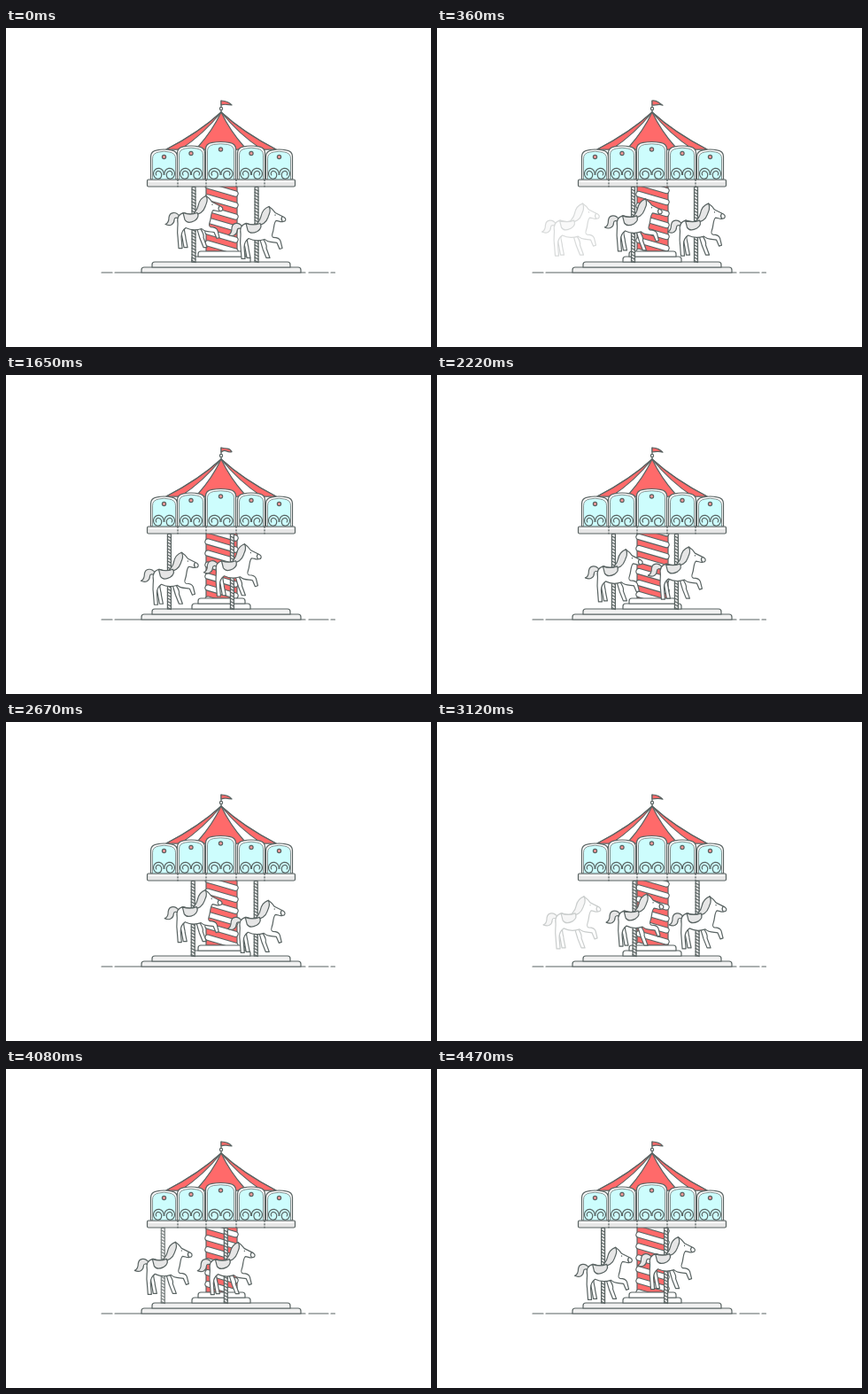
Write an HTML page that moves like this. It is 480x360 px and loops after 4.5 s.

```html
<!DOCTYPE html>
<html lang="en">
<head>
<meta charset="utf-8">
<title>Carousel</title>
<style>
  html, body { margin: 0; width: 100%; height: 100%; overflow: hidden; background: #fff; }
  svg { display: block; width: 100vw; height: 100vh; }
  .line { fill: none; stroke: #596362; stroke-width: 1.2; stroke-linecap: round; stroke-linejoin: round; }
  .white { fill: #fff; }
  .gray { fill: #e6e6e6; }
  .pale { fill: #f1f1f1; }
  .red { fill: #ff6a6a; }
  .pink { fill: #ff9a9a; }
  .cyan { fill: #cdfdfd; }
</style>
</head>
<body>
<svg id="stage" viewBox="0 0 480 360">
  <defs>
    <clipPath id="shaft"><rect x="223" y="179" width="41" height="73"/></clipPath>
    <g id="horse" class="line">
      <path class="gray" d="M-16 23C-20 17-27 18-28 24C-28 29-29 31-32 32C-26 35-22 31-22 27C-22 24-19 24-16 26Z"/>
      <path class="white" d="M-10 35C-12 40-9 43-9 48L-7 58H-11L-13 47L-15 38Z"/>
      <path class="white" d="M7 36C10 41 12 43 11 47L15 58H11L7 48L4 38Z"/>
      <path class="white" d="M14 0C17 2 19 4 21 7L31 12C34 14 33 17 30 17C27 18 25 16 22 16C19 19 20 25 18 30
        C17 33 17 34 19 35C23 35 26 36 27 39L29 47L26 48L23 41C19 40 13 41 9 37C3 39-3 39-9 36
        C-12 38-14 41-14 46L-13 59H-17L-18 46C-19 40-18 36-18 31C-19 25-17 20-11 19C-5 21 1 21 4 18C8 13 6 4 14 0Z"/>
      <path class="gray" d="M14 0C8 2 6 6 5 11C4 16 2 17 0 20C6 22 11 18 13 12C14 8 17 6 14 0Z"/>
      <path class="gray" d="M-12 19Q-4 22 4 19Q7 24 1 28Q-7 32-10 27Z"/>
      <path d="M29 11.500Q27 14 29 16.500M21 9.500v.4"/>
    </g>
  </defs>
  <g class="line">
    <path d="M108 276H120M123 276H338M342 276H364M367 276H371.500"/>
    <path class="pale" d="M153 276V273Q153 270 156 270H330Q333 270 333 273V276Z"/>
    <path class="pale" d="M165 270V267Q165 264 168 264H318Q321 264 321 267V270Z"/>
    <path class="red" d="M226 178H261V252H226Z"/>
    <g clip-path="url(#shaft)"><g id="twist"></g></g>
    <path class="white" d="M210 264V261Q210 258 213 258H273Q276 258 276 261V264Z"/>
    <path class="white" d="M217 258V255Q217 252 220 252H267Q270 252 270 255V258Z"/>
  </g>
  <g id="riders"></g>
  <g class="line">
    <path d="M243 95V82"/>
    <path id="flag" class="red"/>
    <circle class="white" cx="243" cy="91" r="1.600"/>
    <path class="white" d="M243 95Q218 118 181 137H305Q268 118 243 95Z"/>
    <path class="red" d="M243 95Q218 118 181 137H197Q223 120 243 95Z"/>
    <path class="red" d="M243 95Q268 118 305 137H289Q263 120 243 95Z"/>
    <path class="red" d="M243 95Q233 116 217 134V137H269V134Q253 116 243 95Z"/>
  </g>
  <g id="panels" class="line"></g>
  <g class="line">
    <rect class="gray" x="159.500" y="171" width="167" height="8" rx="1.500"/>
    <path d="M162 173.500H324" stroke="#fff"/>
    <path d="M194 171v8M226 171v8M260 171v8M292 171v8" stroke-dasharray="1.500 2"/>
  </g>
</svg>
<script>
const LOOP = 4500, GAP = 71, LAP = 2700, BOB = GAP / 1.5, PITCH = 13;
const byId = id => document.getElementById(id);
const ramp = (v, a, b) => Math.max(0, Math.min(1, (v - a) / (b - a)));

function add(parent, tag, attrs) {
  const el = document.createElementNS('http://www.w3.org/2000/svg', tag);
  for (const key in attrs) el.setAttribute(key, attrs[key]);
  return parent.appendChild(el);
}

// Arched sign panels, outer pairs first
function arch(x, top, half, bottom) {
  const l = x - half, r = x + half;
  return `M${l} ${bottom}V${top + 8}Q${l} ${top + 2} ${l + 7} ${top + 0.8}` +
    `Q${x} ${top - 0.8} ${r - 7} ${top + 0.8}Q${r} ${top + 2} ${r} ${top + 8}V${bottom}Z`;
}
const swirl = 'M0.5 1.5A6 6 0 1 1 7 6.3C2 6 1.500-1 6-2.500C9-3 10.500 0 9 2';
[[178.5, 137, 15], [308.5, 137, 15], [209, 133, 15.5], [277, 133, 15.5], [242.5, 128.5, 17]].forEach(([x, top, half]) => {
  const panels = byId('panels');
  add(panels, 'path', { class: 'white', d: arch(x, top, half, 171) });
  add(panels, 'path', { class: 'cyan', d: arch(x, top + 2.2, half - 2, 171), style: 'stroke-width:.7' });
  add(panels, 'circle', { class: 'pink', cx: x, cy: top + 8.5, r: 2.1 });
  for (const side of [-1, 1]) {
    add(panels, 'path', { class: 'cyan', d: swirl, transform: `translate(${x} 164) scale(${side * half / 15.5} 1)` });
  }
});

// Candy-twist bands of the centre column
for (let y = 165; y < 285; y += PITCH) {
  const d = `M228 ${y}L259 ${y + 9}`;
  add(byId('twist'), 'path', { d, style: 'stroke-width:7.4' });
  add(byId('twist'), 'path', { d, style: 'stroke:#fff;stroke-width:5.2' });
}

let rope = '';
for (let y = 182; y < 264; y += 3.5) rope += `M-2 ${y}L2 ${y + 2}`;
const riders = [0, 1, 2, 3].map(() => {
  const pole = add(byId('riders'), 'g', { class: 'line' });
  add(pole, 'path', { class: 'gray', d: 'M-2 179.500V264H2V179.500Z' });
  add(pole, 'path', { d: rope });
  return { pole, horse: add(byId('riders'), 'use', { href: '#horse' }) };
});

function draw(t) {
  const shift = t / LAP % 1 * GAP;
  riders.forEach(({ pole, horse }, i) => {
    const x = 70 + i * GAP + shift;
    const y = 195.5 - 6 * Math.cos((x - 213) / BOB * 2 * Math.PI);
    pole.setAttribute('transform', `translate(${x} 0)`);
    horse.setAttribute('transform', `translate(${x} ${y})`);
    pole.setAttribute('opacity', ramp(x, 160, 182) * ramp(x, 313, 298));
    horse.setAttribute('opacity', ramp(x, 146, 165) * ramp(x, 312, 297));
  });
  byId('twist').setAttribute('transform', `translate(0 ${-(t / 1350 % 1) * PITCH})`);
  const w = Math.sin(t / 900 * 2 * Math.PI);
  byId('flag').setAttribute('d',
    `M243 82Q247 ${82.2 - w} 250 ${83.5 + w * 0.5}T255 ${87 + w * 0.4}Q252 ${86.5 - w} 249 ${86.3 + w * 0.5}T243 87Z`);
}

function tick() {
  draw(performance.now() % LOOP);
  requestAnimationFrame(tick);
}
tick();
</script>
</body>
</html>
```
